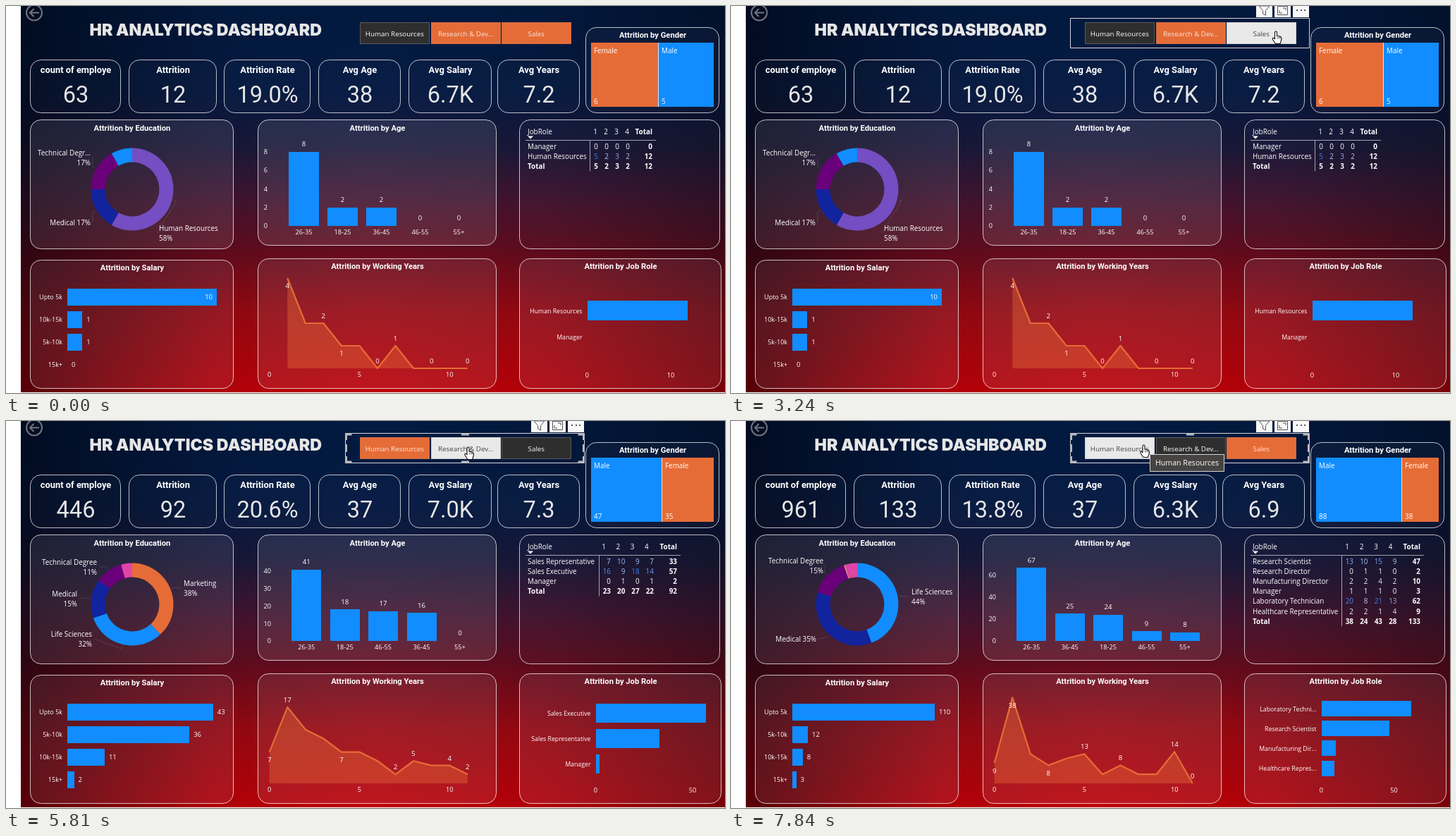
Write an HTML page with a canvas that moves like this. It is 1020 px wide and 549 px high and loops after 8000 ms.

```html
<!DOCTYPE html>
<html lang="en">
<head>
<meta charset="utf-8">
<title>HR analytics dashboard</title>
<style>
html, body { margin: 0; width: 100%; height: 100%; overflow: hidden; background: #fff; }
canvas { display: block; }
</style>
</head>
<body>
<canvas id="stage" width="1020" height="549"></canvas>
<script>
const ctx = document.getElementById('stage').getContext('2d');
const LOOP = 8000;
const BLUE = '#118dff', ORANGE = '#e66c37', NAVY = '#12239e', PLUM = '#6b007b', VIOLET = '#744ec2', PINK = '#e044a7';
const SANS = '"Open Sans", "Noto Sans", sans-serif', DIN = 'Roboto, sans-serif';

// Everything that depends on the selected department
const DATA = [
  {
    cards: ['63', '12', '19.0%', '38', '6.7K', '7.2'],
    gender: [['Female', 6, ORANGE], ['Male', 5, BLUE]], split: 925,
    donut: [[7, VIOLET], [2, NAVY], [2, PLUM], [1, BLUE]],
    notes: [['Human Resources', '58%', 217, 315, 'left', 0], ['Medical 17%', '', 120, 307, 'right', 1],
            ['Technical Degr...', '17%', 120, 208, 'right', 2]],
    age: { x: 422.5, step: 55, w: 43, unit: 13.15, tick: 2, tickX: 371,
           rows: [['26-35', 8], ['18-25', 2], ['36-45', 2], ['46-55', 0], ['55+', 0]] },
    salary: { unit: 21.2, rows: [['Upto 5k', 10], ['10k-15k', 1], ['5k-10k', 1], ['15k+', 0]] },
    years: { unit: 32, first: 1, values: [4, 2, 2, 1, 1, 0, 1, 0, 0, 0, 0], above: [3, 6, 7, 9, 11], below: [1, 4] },
    roles: { x: 824.5, y: 432, step: 37, h: 28, unit: 11.85, tick: 10, rows: [['Human Resources', 12], ['Manager', 0]] },
    matrix: { head: 836, right: 840, step: 15, line: 828, total: 917,
              rows: [['Manager', 0, 0, 0, 0], ['Human Resources', 5, 2, 3, 2]] }
  },
  {
    cards: ['446', '92', '20.6%', '37', '7.0K', '7.3'],
    gender: [['Male', 47, BLUE], ['Female', 35, ORANGE]], split: 930,
    donut: [[35, ORANGE], [29, BLUE], [14, NAVY], [10, PLUM], [4, PINK]],
    notes: [['Marketing', '38%', 252, 230, 'left', 0], ['Life Sciences', '32%', 122, 302, 'right', 1],
            ['Medical', '15%', 101, 245, 'right', 2], ['Technical Degree', '11%', 129, 200, 'right', 3]],
    age: { x: 426.3, step: 54.4, w: 42, unit: 2.475, tick: 10, tickX: 376,
           rows: [['26-35', 41], ['18-25', 18], ['46-55', 17], ['36-45', 16], ['55+', 0]] },
    salary: { unit: 4.81, rows: [['Upto 5k', 43], ['5k-10k', 36], ['10k-15k', 11], ['15k+', 2]] },
    years: { unit: 6.35, first: 0, values: [7, 17, 12, 10, 7, 7, 5, 2, 5, 4, 4, 2], above: [1, 7, 8, 10, 11], below: [0, 4] },
    roles: { x: 836.5, y: 414, step: 36, h: 27, unit: 2.75, tick: 50,
             rows: [['Sales Executive', 57], ['Sales Representative', 33], ['Manager', 2]] },
    matrix: { head: 848, right: 858, step: 20.3, line: 841, total: 952,
              rows: [['Sales Representative', 7, 10, 9, 7], ['Sales Executive', 16, 9, 18, 14], ['Manager', 0, 1, 0, 1]] }
  },
  {
    cards: ['961', '133', '13.8%', '37', '6.3K', '6.9'],
    gender: [['Male', 88, BLUE], ['Female', 38, ORANGE]], split: 951,
    donut: [[59, BLUE], [47, NAVY], [20, PLUM], [1, '#e6788c'], [6, PINK]],
    notes: [['Life Sciences', '44%', 256, 242, 'left', 0], ['Medical 35%', '', 121, 309, 'right', 1],
            ['Technical Degree', '15%', 131, 198, 'right', 2]],
    age: { x: 426.3, step: 54.4, w: 42, unit: 1.55, tick: 20, tickX: 376,
           rows: [['26-35', 67], ['36-45', 25], ['18-25', 24], ['46-55', 9], ['55+', 8]] },
    salary: { unit: 1.836, rows: [['Upto 5k', 110], ['5k-10k', 12], ['10k-15k', 8], ['15k+', 3]] },
    years: { unit: 3.2, first: 0, values: [9, 38, 13, 8, 11, 13, 4, 8, 4, 4, 14, 0], above: [5, 7, 10, 11], below: [0, 1, 3] },
    roles: { x: 837.5, y: 408, step: 28.2, h: 22, unit: 2.06, tick: 50,
             rows: [['Laboratory Techni...', 62], ['Research Scientist', 47], ['Manufacturing Dir...', 10], ['Healthcare Repres...', 9]] },
    matrix: { head: 874, right: 883, step: 20.5, line: 866, total: 978,
              rows: [['Research Scientist', 13, 10, 15, 9], ['Research Director', 0, 1, 1, 0],
                     ['Manufacturing Director', 2, 2, 4, 2], ['Manager', 1, 1, 1, 0],
                     ['Laboratory Technician', 20, 8, 21, 13], ['Healthcare Representative', 2, 2, 1, 4]] }
  }
];

const CARDS = [['count of employe', 34, 163], ['Attrition', 174, 299], ['Attrition Rate', 309, 432],
               ['Avg Age', 443, 560], ['Avg Salary', 571, 689], ['Avg Years', 697, 814]];
// title, left, top, right, bottom, title y, fill opacity
const PANELS = [['Attrition by Gender', 822, 30, 1012, 152, 41, .03], ['Attrition by Education', 34, 161, 323, 345, 173, .11],
                ['Attrition by Age', 357, 161, 696, 340, 173, .12], ['', 728, 161, 1013, 345, 0, .02],
                ['Attrition by Salary', 34, 360, 323, 543, 371, .09], ['Attrition by Working Years', 357, 358, 696, 543, 369, .1],
                ['Attrition by Job Role', 728, 358, 1015, 543, 369, .09]];
const BUTTONS = [['Human Resources', 502], ['Research & Dev...', 603], ['Sales', 703]];
// time, x, y of the pointer tip
const PATH = [[980, 850, 530], [1260, 800, 215], [1610, 800, 215], [2080, 780, 70], [2360, 771, 31], [2430, 771, 31],
              [2710, 773, 36], [3900, 773, 36], [4260, 684, -9], [4400, 680, -24], [4740, 690, 12], [5280, 655.5, 37],
              [6550, 655.5, 37], [7350, 584, 33], [7410, 584, 33], [7480, 585.5, 34]];

// Edges are kept on whole pixels
function rect(x, y, w, h, fill) {
  const left = Math.round(x), top = Math.round(y);
  ctx.fillStyle = fill;
  ctx.fillRect(left, top, Math.round(x + w) - left, Math.round(y + h) - top);
}

// y is the middle of the capitals
function text(s, x, y, size = 9.9, align = 'left', color = '#fff', weight = 500, font = SANS) {
  ctx.font = `${weight} ${size}px ${font}`;
  ctx.textAlign = align;
  ctx.fillStyle = color;
  ctx.fillText(s, x, y + size * .36);
}

function line(points, color, width = 1) {
  ctx.beginPath();
  points.forEach(p => ctx.lineTo(...p));
  ctx.strokeStyle = color;
  ctx.lineWidth = width;
  ctx.stroke();
}

function frame(x, y, r, b, color) {
  ctx.strokeStyle = color;
  ctx.lineWidth = 1;
  ctx.strokeRect(x + .5, y + .5, r - x - 1, b - y - 1);
}

function panel(x, y, r, b, alpha) {
  ctx.beginPath();
  ctx.roundRect(x + .5, y + .5, r - x - 1, b - y - 1, 15);
  ctx.fillStyle = `rgba(205,200,215,${alpha})`;
  ctx.fill();
  ctx.strokeStyle = 'rgba(255,255,255,.72)';
  ctx.lineWidth = 1;
  ctx.stroke();
}

function gradient(x, y, stops) {
  const g = ctx.createLinearGradient(x ? 20 : 0, 0, x, y);
  stops.forEach(s => g.addColorStop(...s));
  return g;
}

function backdrop() {
  rect(0, 0, 1020, 549, '#fff');
  rect(21, 0, 999, 548, gradient(0, 548, [[0, '#021a40'], [.22, '#051a42'], [.36, '#19183a'],
    [.5, '#431430'], [.63, '#640c1e'], [.8, '#9c0811'], [1, '#bf0008']]));
  rect(21, 0, 999, 548, gradient(1020, 0, [[0, 'rgba(0,0,8,.55)'], [.28, 'rgba(0,0,8,.08)'], [.5, 'rgba(0,0,8,0)'],
    [.75, 'rgba(0,0,8,.08)'], [1, 'rgba(0,0,8,.36)']]));
  ctx.beginPath();
  ctx.arc(40, 9.5, 11, 0, 7);
  ctx.strokeStyle = '#74747c';
  ctx.lineWidth = 2;
  ctx.stroke();
  line([[47, 9.5], [34, 9.5]], '#74747c', 2);
  line([[39.5, 4], [34, 9.5], [39.5, 15]], '#74747c', 2);
  text('HR ANALYTICS DASHBOARD', 118.5, 33.5, 23.2, 'left', '#e6e6e6', 900, 'Inter, sans-serif');
}

function panels(d) {
  CARDS.forEach(([name, x, r], i) => {
    const mid = (x + r) / 2;
    panel(x, 76, r, 152, .02);
    text(name, mid + .5, 90, 12.9, 'center', '#fff', 700, DIN);
    text(d.cards[i], mid + .5, 125, 32.5, 'center', '#e6e6e6', 400, DIN);
  });
  for (const [name, x, y, r, b, ty, alpha] of PANELS) {
    panel(x, y, r, b, alpha);
    text(name, (x + r) / 2 + .5, ty, 11.2, 'center', '#fff', 700, DIN);
  }
}

function gender(d) {
  const edges = [830, d.split, 1004];
  d.gender.forEach(([name, n, color], i) => {
    const x = edges[i] + i;
    rect(x, 52, edges[i + 1] - x, 91, color);
    text(name, x + 4, 63);
    text(n, x + 4, 135.5);
  });
  rect(d.split, 52, 1, 91, '#dfe3ec');
}

function donut(d) {
  const cx = 179, cy = 260, sum = d.donut.reduce((s, p) => s + p[0], 0), mids = [];
  let a = -Math.PI / 2;
  for (const [n, color] of d.donut) {
    const b = a + n / sum * 2 * Math.PI;
    ctx.beginPath();
    ctx.arc(cx, cy, 58.5, a, b);
    ctx.arc(cx, cy, 38.5, b, a, true);
    ctx.fillStyle = color;
    ctx.fill();
    mids.push((a + b) / 2);
    a = b;
  }
  for (const [name, share, x, y, align, slice] of d.notes) {
    const at = r => [cx + r * Math.cos(mids[slice]), cy + r * Math.sin(mids[slice])];
    const ly = share ? y + 7 : y;
    line([at(60), at(65), [x + (align == 'left' ? -3 : 3), ly]], 'rgba(200,200,210,.16)');
    text(name, x, y, 9.9, align);
    text(share, x, y + 14, 9.9, align);
  }
}

function ages({ x, step, w, unit, tick, tickX, rows }) {
  for (let v = 0; v <= rows[0][1]; v += tick) text(v, tickX, 312 - v * unit, 9.2, 'right');
  rows.forEach(([name, n], i) => {
    const mid = x + i * step, h = n * unit;
    rect(mid - w / 2, 312 - h, w, h, BLUE);
    text(n, mid, 301 - h, 9.6, 'center');
    text(name, mid, 321, 9.2, 'center');
  });
}

function salaries({ unit, rows }) {
  rows.forEach(([name, n], i) => {
    const y = 413 + i * 32, w = n * unit;
    rect(87, y - 12, w, 24, BLUE);
    text(name, 80, y, 9, 'right');
    if (w > 210) text(n, 81 + w, y - .5, 9.5, 'right');
    else text(n, 93 + w, y - .5, 9.5);
  });
}

function years({ unit, first, values, above, below }) {
  const at = i => [373.7 + i * 25.55, 514 - values[i - first] * unit];
  const points = values.map((v, i) => at(i + first));
  ctx.beginPath();
  ctx.moveTo(points[0][0], 514);
  points.forEach(p => ctx.lineTo(...p));
  ctx.lineTo(points.at(-1)[0], 514);
  ctx.fillStyle = 'rgba(230,108,55,.4)';
  ctx.fill();
  ctx.lineJoin = 'round';
  line(points, ORANGE, 2.2);
  const mark = (i, dy) => text(values[i - first], at(i)[0], at(i)[1] + dy, 9.6, 'center');
  above.forEach(i => mark(i, -10.5));
  below.forEach(i => mark(i, 11));
  [0, 5, 10].forEach(v => text(v, 373.7 + v * 25.55, 523, 9.2, 'center'));
}

function roles({ x, y, step, h, unit, tick, rows }) {
  rows.forEach(([name, n], i) => {
    const mid = y + i * step;
    rect(x, mid - h / 2, n * unit, h, BLUE);
    text(name, x - 7, mid + .5, 8.75, 'right');
  });
  [0, tick].forEach(v => text(v, x + v * unit, 524, 9.2, 'center'));
}

function matrix({ head, right, step, line: lx, total, rows }) {
  const max = Math.max(...rows.flatMap(r => r.slice(1)));
  const sum = list => list.reduce((a, b) => a + b, 0);
  const shade = v => {
    const k = v / max, mix = (a, b) => Math.round(a + (b - a) * k);
    return `rgb(${mix(255, 65)},${mix(255, 125)},${mix(255, 230)})`;
  };
  const yOf = i => 199 + i * 14.2, last = yOf(rows.length);
  text('JobRole', 740, 178);
  ctx.beginPath();
  ctx.moveTo(740, 184.5);
  ctx.lineTo(748, 184.5);
  ctx.lineTo(744, 188.5);
  ctx.fill();
  text('Total', total, 178, 9.9, 'right', '#fff', 700);
  line([[737, 190.5], [total + 5, 190.5]], 'rgba(255,255,255,.6)');
  line([[lx + .5, 191], [lx + .5, last + 7]], 'rgba(255,255,255,.6)');
  rows.forEach(([name, ...cells], i) => {
    text(name, 740, yOf(i));
    cells.forEach((v, c) => text(v, right + c * step, yOf(i), 9.9, 'right', shade(v)));
    text(sum(cells), total, yOf(i), 9.9, 'right', '#fff', 700);
  });
  text('Total', 740, last, 9.9, 'left', '#fff', 700);
  for (let c = 0; c < 4; c++) {
    text(c + 1, head + c * step, 178, 9.9, 'center');
    text(sum(rows.map(r => r[c + 1])), right + c * step, last, 9.9, 'right', '#fff', 700);
  }
  text(sum(rows.map(r => sum(r.slice(1)))), total, last, 9.9, 'right', '#fff', 700);
}

const inside = (p, x, y, r, b) => p && p[0] >= x && p[0] < r && p[1] >= y && p[1] < b;
const buttonAt = p => BUTTONS.findIndex(([, x]) => inside(p, x, 23, x + 99, 54));

function slicer(selected, hovered) {
  BUTTONS.forEach(([name, x], i) => {
    const [fill, ink, edge] = i == hovered ? ['#e9e9e9', '#444', '#d0d0d0']
      : i == selected ? ['#2f2e2e', '#fff', '#5c5a58'] : [ORANGE, '#fbe6dc', '#c76f48'];
    rect(x, 23, 99, 31, fill);
    frame(x, 23, x + 99, 54, edge);
    text(name, x + 49.3, 39, 9.8, 'center', ink);
  });
}

function icon(kind, x, y) {
  rect(x, y, 23, 20, '#f8f8f8');
  const ink = '#555';
  if (kind == 'filter')
    line([[x + 4, y + 4], [x + 19, y + 4], [x + 13.5, y + 10.5], [x + 13.5, y + 17], [x + 9.5, y + 15], [x + 9.5, y + 10.5], [x + 4, y + 4]], ink);
  else if (kind == 'focus') {
    frame(x + 4, y + 4, x + 19, y + 17, ink);
    line([[x + 12, y + 7], [x + 16, y + 7], [x + 16, y + 10]], ink);
    line([[x + 7, y + 10], [x + 7, y + 14], [x + 11, y + 14]], ink);
  } else for (let i = 0; i < 3; i++) rect(x + 5 + i * 5.5, y + 9, 2, 2, ink);
}

function header(kinds, x, y, r, b, color = 'rgba(200,200,205,.8)') {
  frame(x, y, r, b, color);
  kinds.forEach((k, i) => icon(k, r - 24 - (kinds.length - 1 - i) * 26, y - 21));
}

function handles() {
  const x = 482.5, y = 19, r = 819.5, b = 58, mx = 651.5, my = 38.5, color = '#b9b9bb';
  for (const [cx, sx] of [[x, 8], [r, -8]]) {
    for (const [cy, sy] of [[y, 8], [b, -8]]) line([[cx + sx, cy], [cx, cy], [cx, cy + sy]], color, 3);
    line([[cx, my - 5.5], [cx, my + 5.5]], color, 3);
  }
  for (const cy of [y, b]) line([[mx - 5.5, cy], [mx + 5.5, cy]], color, 3);
}

function hover(t) {
  const all = ['filter', 'focus', 'more'];
  if (t < 980) return;
  if (t < 1140) header(all, 728, 358, 1016, 543);
  else if (t < 1785) header(all, 728, 161, 1014, 345);
  else if (t < 2195) header(['filter', 'more'], 697, 76, 815, 152);
  else header(all, 481, 17, 821, 60, 'rgba(235,235,238,.9)');
  if (t >= 3970) handles();
}

function pointer(t) {
  if (t < PATH[0][0]) return null;
  const i = PATH.findIndex(p => p[0] > t);
  if (i < 0) return PATH.at(-1).slice(1);
  const [t0, x0, y0] = PATH[i - 1], [t1, x1, y1] = PATH[i], k = (t - t0) / (t1 - t0);
  return [x0 + (x1 - x0) * k, y0 + (y1 - y0) * k];
}

const HAND = new Path2D('M-1.5 1Q0-1 1.5 1V6.2L6.5 7.4Q8.3 8 8 10.5L7 14.5 6 17.5H-.5L-4.5 11.5Q-5.2 9-3 9.2L-1.5 10.8Z');
const ARROW = new Path2D('M0 0V16L3.7 12.6 6.2 18.4 8.6 17.4 6.1 11.7H11.2Z');

function cursor([x, y], shape) {
  ctx.save();
  ctx.translate(x, y);
  ctx.fillStyle = '#fff';
  ctx.strokeStyle = '#111';
  ctx.lineWidth = 1.1;
  ctx.fill(shape);
  ctx.stroke(shape);
  if (shape == HAND) for (const fx of [2, 4.3, 6.2]) line([[fx, 8], [fx, 10.5]], '#333', .8);
  ctx.restore();
}

function click(x, y) {
  ctx.beginPath();
  ctx.arc(x, y, 11.5, 0, 7);
  ctx.fillStyle = 'rgba(255,255,0,.47)';
  ctx.fill();
}

function draw(t) {
  const d = DATA[t < 3970 ? 0 : t < 6550 ? 1 : 2];
  const p = pointer(t), button = buttonAt(p);
  backdrop();
  panels(d);
  gender(d);
  donut(d);
  ages(d.age);
  salaries(d.salary);
  years(d.years);
  roles(d.roles);
  matrix(DATA[t < 4400 ? 0 : t < 7000 ? 1 : 2].matrix);
  slicer(t < 3970 ? 0 : t < 6230 ? 2 : 1, button);
  hover(t);
  if (t >= 7840) {
    rect(594, 47, 106, 25, '#464443');
    frame(594, 47, 700, 72, '#d2d2d2');
    text('Human Resources', 647, 59.5, 10.6, 'center');
  }
  if (t >= 3040 && t < 3240) click(773.5, 35.5);
  if (t >= 5540 && t < 5810) click(655.5, 36.5);
  const onIcon = t > 1785 && t < 2195 && inside(p, 765, 54, 815, 75);
  if (p) cursor(p, button >= 0 || onIcon ? HAND : ARROW);
}

const start = performance.now();
function tick() {
  draw((performance.now() - start) % LOOP);
  requestAnimationFrame(tick);
}
tick();
</script>
</body>
</html>
```
